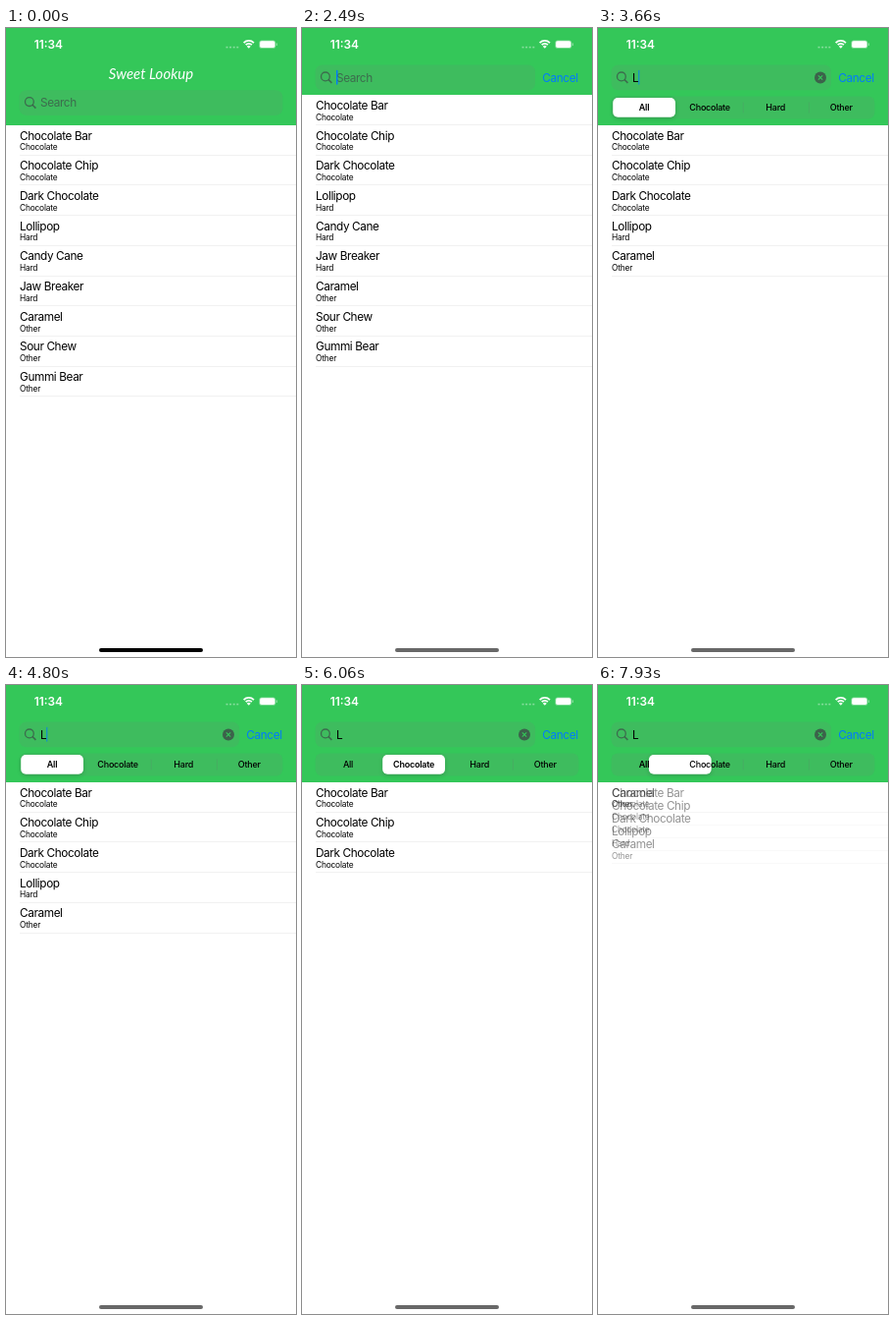
Recreate the animation shown at these times as an HTML page with a canvas. Size 296x640 px, loop 8000 ms.

```html
<!DOCTYPE html>
<html lang="en">
<head>
<meta charset="utf-8">
<title>Sweet Lookup</title>
<style>
  html, body { margin: 0; width: 100%; height: 100%; overflow: hidden; background: #fff; }
  canvas { display: block; width: 296px; height: 640px; }
</style>
</head>
<body>
<canvas id="stage"></canvas>
<script>
const W = 296, H = 640, LOOP = 8000, STEP = 110;
const canvas = document.getElementById('stage');
const ctx = canvas.getContext('2d');
const ratio = window.devicePixelRatio || 1;
canvas.width = W * ratio;
canvas.height = H * ratio;

const GREEN = '#34c759', BLUE = '#007aff';
const FILL = 'rgba(118,118,128,.14)', HINT = 'rgba(60,60,67,.62)';
const ROW = 30.7, TALL = 98.6, LOW = TALL - ROW;
const SCOPES = ['All', 'Chocolate', 'Hard', 'Other'];
const CANDIES = [
  ['Chocolate Bar', 'Chocolate'], ['Chocolate Chip', 'Chocolate'],
  ['Dark Chocolate', 'Chocolate'], ['Lollipop', 'Hard'],
  ['Candy Cane', 'Hard'], ['Jaw Breaker', 'Hard'],
  ['Caramel', 'Other'], ['Sour Chew', 'Other'], ['Gummi Bear', 'Other']
];

// Activity starts; motion inside each burst advances in fixed steps.
const BURSTS = [0, 1240, 2010, 2380, 3030, 3660, 4020, 4680, 5010, 5710, 6750, 7700];
const TYPED = 3030, FOCUSED = 1570;
const SWITCHES = [
  { at: 5092, from: 0, to: 1 },
  { at: 6050, from: 1, to: 2 },
  { at: 6990, from: 2, to: 3 },
  { at: 7785, from: 3, to: 0 }
];

const clamp = v => Math.max(0, Math.min(1, v));
const mix = (a, b, p) => a + (b - a) * p;
const smooth = v => { v = clamp(v); return v * v * (3 - 2 * v); };
const easeOut = v => 1 - Math.pow(1 - clamp(v), 3);

function stepped(t) {
  const start = BURSTS.filter(b => b <= t).pop();
  return start + Math.floor((t - start) / STEP) * STEP;
}

function withAlpha(a, draw) {
  if (a <= 0) return;
  ctx.save();
  ctx.globalAlpha *= Math.min(1, a);
  draw();
  ctx.restore();
}

function text(str, x, y, size, { color = '#000', weight = 400, gap = 0, align = 'left' } = {}) {
  ctx.font = `${weight} ${size}px Inter, Roboto, sans-serif`;
  ctx.letterSpacing = gap + 'px';
  ctx.textAlign = align;
  ctx.fillStyle = color;
  ctx.fillText(str, x, y);
}

function box(x, y, w, h, r, color) {
  ctx.fillStyle = color;
  ctx.beginPath();
  ctx.roundRect(x, y, w, h, r);
  ctx.fill();
}

function line(x1, y1, x2, y2, color, width) {
  ctx.strokeStyle = color;
  ctx.lineWidth = width;
  ctx.beginPath();
  ctx.moveTo(x1, y1);
  ctx.lineTo(x2, y2);
  ctx.stroke();
}

function matches(scope) {
  return CANDIES.filter(([name, kind]) =>
    /l/i.test(name) && (scope === 0 || kind === SCOPES[scope]));
}

function drawRows(rows, top, gap, alpha) {
  withAlpha(alpha, () => rows.forEach(([name, kind], i) => {
    const y = top + i * gap;
    text(name, 14, Math.round(y + 14.95), 11.8, { gap: -0.4 });
    text(kind, 14, Math.round(y + 25.75), 8.4, { gap: -0.2 });
    ctx.fillStyle = '#f1f1f1';
    ctx.fillRect(14, Math.round(y + ROW - 0.5), W - 14, 1);
  }));
}

// Both lists share one span that eases from the old height to the new one.
function drawSwitch(before, after, p) {
  const span = mix(before.length - 1, after.length - 1, p) * ROW;
  const gap = rows => rows.length > 1 ? span / (rows.length - 1) : ROW;
  drawRows(before, TALL, gap(before), 1 - p);
  drawRows(after, TALL, gap(after), p);
}

function drawStatus() {
  text('11:34', 28.7, 21, 11.9, { color: '#fff', weight: 600 });
  ctx.fillStyle = 'rgba(255,255,255,.4)';
  for (let i = 0; i < 4; i++) ctx.fillRect(224.5 + i * 3.6, 18.8, 2, 1.6);

  ctx.strokeStyle = '#fff';
  ctx.lineWidth = 1.8;
  for (const r of [4.4, 7.3]) {
    ctx.beginPath();
    ctx.arc(247.8, 20.2, r, -Math.PI * 0.75, -Math.PI * 0.25);
    ctx.stroke();
  }
  ctx.fillStyle = '#fff';
  ctx.beginPath();
  ctx.moveTo(247.8, 20.8);
  ctx.arc(247.8, 20.8, 2.8, -Math.PI * 0.75, -Math.PI * 0.25);
  ctx.fill();

  box(258.4, 12.4, 16.8, 8.4, 2.6, 'rgba(255,255,255,.4)');
  box(259.2, 13.2, 15.2, 6.8, 1.8, '#fff');
  box(275.8, 15.3, 1, 2.6, 0.5, 'rgba(255,255,255,.5)');
}

function caretAlpha(t) {
  if (t < FOCUSED) return 0;
  if (t < FOCUSED + STEP) return 0.4;
  if (t < 2010 || (t >= TYPED && t < 3660)) return 1;
  const u = t < TYPED ? t - 2010 : (t - 3660) % 1030;
  if (u < STEP) return 0.6;
  if (u < 360) return 0;
  return u < 360 + STEP ? 0.5 : 1;
}

function drawSearch(t, focus) {
  const y = mix(76, 50.3, focus), typed = t >= TYPED;
  const right = mix(282.4, 238, focus);
  box(13.6, y - 12.8, right - 13.6, 25.7, 7, FILL);

  ctx.strokeStyle = HINT;
  ctx.lineWidth = 1.3;
  ctx.beginPath();
  ctx.arc(23.9, y - 0.9, 4.4, 0, Math.PI * 2);
  ctx.stroke();
  line(27.1, y + 2.3, 30.4, y + 5.6, HINT, 1.5);

  if (typed) {
    text('L', 35, y + 4.6, 11.8);
    ctx.fillStyle = 'rgba(60,60,67,.7)';
    ctx.beginPath();
    ctx.arc(227, y + 0.2, 6, 0, Math.PI * 2);
    ctx.fill();
    line(224.8, y - 2, 229.2, y + 2.4, GREEN, 1.1);
    line(224.8, y + 2.4, 229.2, y - 2, GREEN, 1.1);
  } else {
    text('Search', 35, y + 4.4, 11.8, { color: HINT, gap: -0.4 });
  }
  withAlpha(caretAlpha(t), () =>
    box(typed ? 41 : 35, y - 7.5, 1.4, 15, 0.7, BLUE));
  withAlpha(focus, () =>
    text('Cancel', mix(296, 245.3, focus), y + 4.3, 11.8, { color: BLUE, gap: -0.4 }));
}

function drawScopes(pos, selected) {
  box(13.6, 69.5, 268.8, 22.9, 6.3, FILL);
  for (let i = 1; i < 4; i++) {
    const gone = Math.abs(pos + 0.5 - i) < 0.9;
    if (!gone) box(13.6 + i * 67.1, 75.5, 0.8, 11, 0, 'rgba(110,120,120,.25)');
  }
  ctx.save();
  ctx.shadowColor = 'rgba(0,0,0,.16)';
  ctx.shadowBlur = 4 * ratio;
  ctx.shadowOffsetY = 1.5 * ratio;
  box(15.2 + pos * 67, 71.1, 63.8, 19.6, 5, '#fff');
  ctx.restore();
  SCOPES.forEach((name, i) => text(name, 47 + i * 67.1, 84.3, 9, {
    weight: i === selected ? 600 : 500, gap: -0.25, align: 'center'
  }));
}

function render(time) {
  const t = stepped(time);
  const focus = smooth((t - 1530) / 215);
  const scope = smooth((t - 2980) / 380);
  const header = mix(mix(TALL, LOW, focus), TALL, scope);

  const change = SWITCHES.filter(s => s.at <= t).pop() || { at: 0, from: 0, to: 0 };
  const pos = mix(change.from, change.to, easeOut((t - change.at) / 312));

  ctx.setTransform(ratio, 0, 0, ratio, 0, 0);
  ctx.fillStyle = '#fff';
  ctx.fillRect(0, 0, W, H);

  if (t < FOCUSED) drawRows(CANDIES, TALL, ROW, 1);
  else if (t < TYPED) drawRows(CANDIES, LOW, ROW, mix(0.75, 1, focus));
  else if (t < SWITCHES[0].at) drawRows(matches(0), header, ROW, 1);
  else drawSwitch(matches(change.from), matches(change.to), smooth((t - change.at) / 300));

  ctx.fillStyle = GREEN;
  ctx.fillRect(0, 0, W, Math.round(header));
  drawStatus();
  withAlpha(Math.pow(1 - focus, 3), () => {
    ctx.font = 'italic 400 15px Lato, sans-serif';
    ctx.letterSpacing = '0px';
    ctx.textAlign = 'center';
    ctx.fillStyle = '#fff';
    ctx.fillText('Sweet Lookup', 148, 52);
  });
  drawSearch(t, focus);
  withAlpha(scope, () => drawScopes(pos, change.to));

  const shade = Math.round(mix(0, 104, clamp((t - 1130) / 330)));
  box(95, 631, 106, 4, 2, `rgb(${shade},${shade},${shade})`);
}

function tick() {
  render(performance.now() % LOOP);
  requestAnimationFrame(tick);
}
tick();
</script>
</body>
</html>
```
